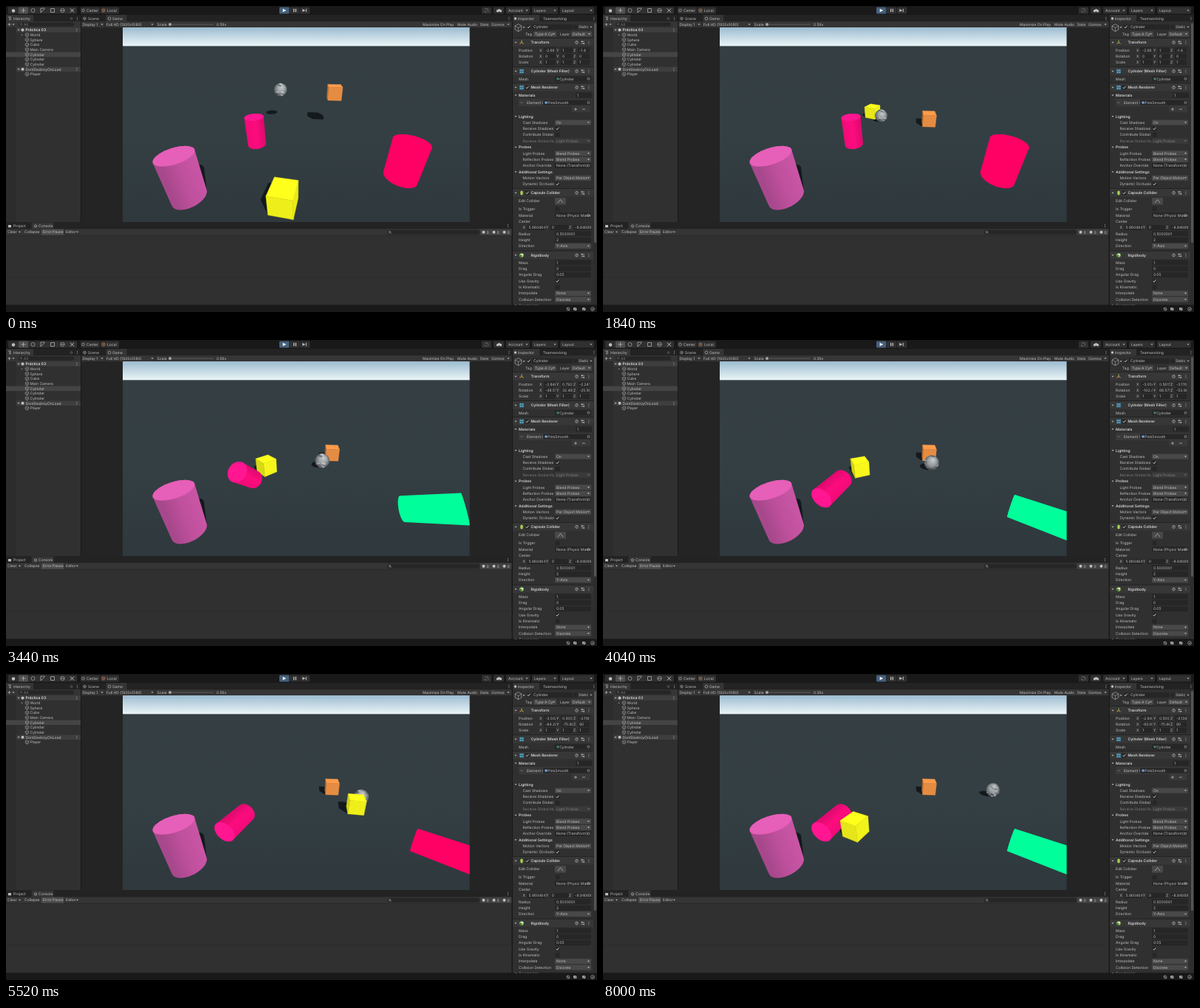
An HTML page with a canvas for the animation above (8040 ms loop, 800 by 415 pixels).

```html
<!DOCTYPE html>
<html lang="en">
<head>
<meta charset="utf-8">
<title>Physics practice</title>
<style>
html, body { margin: 0; width: 100%; height: 100%; overflow: hidden; background: #191919; }
canvas { display: block; }
</style>
</head>
<body>
<canvas id="stage" width="800" height="415"></canvas>
<script>
const ctx = document.getElementById('stage').getContext('2d');
const LOOP = 8040, STEP = 40, TAU = Math.PI * 2;
const INK = '#c0c0c0', DIM = '#7d7d7d', BOLD = '#d6d6d6';
const PANEL = '#303031', BAR = '#353536', STRIP = '#232324', FIELD = '#262627', DROP = '#484849', EDGE = '#191919';

// ---------- drawing helpers ----------
function box(x, y, w, h, c) { ctx.fillStyle = c; ctx.fillRect(x, y, w, h); }
function round(x, y, w, h, c, r = 1) {
  ctx.fillStyle = c; ctx.beginPath(); ctx.roundRect(x, y, w, h, r); ctx.fill();
}
function text(s, x, y, c = INK, bold = false, maxW = 0) {
  ctx.save();
  if (maxW) { ctx.beginPath(); ctx.rect(x - 1, y - 5, maxW + 1, 10); ctx.clip(); }
  ctx.font = (bold ? '600 ' : '') + '5px Inter, "Liberation Sans", sans-serif';
  ctx.textRendering = 'geometricPrecision';
  ctx.fillStyle = c;
  ctx.fillText(s, x, y + 1.8);
  ctx.restore();
}
function trace(pts) { ctx.beginPath(); pts.forEach(p => ctx.lineTo(p[0], p[1])); }
function poly(pts, fill) { trace(pts); ctx.fillStyle = fill; ctx.fill(); }
function line(pts, c = INK, w = .7) { trace(pts); ctx.strokeStyle = c; ctx.lineWidth = w; ctx.stroke(); }
function disc(x, y, r, c = INK) { ctx.beginPath(); ctx.arc(x, y, r, 0, TAU); ctx.fillStyle = c; ctx.fill(); }
function ring(x, y, r, c = INK) {
  ctx.beginPath(); ctx.arc(x, y, r, 0, TAU); ctx.strokeStyle = c; ctx.lineWidth = .6; ctx.stroke();
}
function plus(x, y, r = 2) { line([[x - r, y], [x + r, y]]); line([[x, y - r], [x, y + r]]); }
function arrow(x, y, c = INK) { poly([[x - 1.5, y - .8], [x + 1.5, y - .8], [x, y + 1]], c); }
function play(x, y, r, c) { poly([[x - r, y - r], [x + r, y], [x - r, y + r]], c); }
function dots(x, y) { for (let i = -1; i < 2; i++) box(x, y + i * 1.7 - .4, .8, .8, INK); }
function check(x, y, on = true) {
  round(x - 3, y - 3, 6, 6, FIELD);
  if (on) line([[x - 1.7, y], [x - .5, y + 1.4], [x + 1.9, y - 1.7]], '#d8d8d8', .9);
}
function cubeIcon(x, y, r, c = '#a9a9a9') {
  const p = Array.from({ length: 7 }, (_, i) => [x + r * Math.sin(i * TAU / 6), y - r * Math.cos(i * TAU / 6)]);
  line(p, c, .6);
  for (const i of [1, 3, 5]) line([[x, y], p[i]], c, .5);
}
function hull(pts) {
  pts = pts.slice().sort((a, b) => a[0] - b[0] || a[1] - b[1]);
  const half = list => {
    const h = [];
    for (const p of list) {
      while (h.length > 1) {
        const [a, b] = h.slice(-2);
        if ((b[0] - a[0]) * (p[1] - a[1]) > (b[1] - a[1]) * (p[0] - a[0])) break;
        h.pop();
      }
      h.push(p);
    }
    h.pop();
    return h;
  };
  return half(pts).concat(half(pts.reverse()));
}

// ---------- vectors and easing ----------
const ramp = (t, a, b) => Math.min(1, Math.max(0, (t - a) / (b - a)));
const smooth = k => k * k * (3 - 2 * k);
const lerp = (a, b, k) => a.map((v, i) => v + (b[i] - v) * k);
const dot = (a, b) => a[0] * b[0] + a[1] * b[1] + a[2] * b[2];
const along = (p, d, k) => p.map((v, i) => v + d[i] * k);
const unit = v => v.map(n => n / Math.hypot(...v));
const cross = (a, b) => [a[1] * b[2] - a[2] * b[1], a[2] * b[0] - a[0] * b[2], a[0] * b[1] - a[1] * b[0]];

// ---------- camera ----------
const F = 227.8, CX = 393, CY = 161.5, EYE = 5.87;
const SP = Math.sin(25 * TAU / 360), CP = Math.cos(25 * TAU / 360);
const SUN = [.32, .766, -.557];
const depth = ([, y, z]) => z * CP - (y - EYE) * SP;
const project = p => [CX + F * p[0] / depth(p), CY - F * ((p[1] - EYE) * CP + p[2] * SP) / depth(p)];
const facing = (n, p) => dot(n, along(p, [0, -EYE, 0], 1)) < 0;
function unproject(sx, sy, y) {
  const b = (sy - CY) / F, d = (EYE - y) / (SP + b * CP);
  return [(sx - CX) / F * d, y, d * (CP - b * SP)];
}
function castShadow(pts) {
  poly(hull(pts.map(([x, y, z]) => project([x - .42 * y, 0, z + .727 * y]))), '#13191c');
}
function rim(c, axis, r) {
  const u = unit(cross(axis, [.31, .2, .93])), v = cross(axis, u);
  return Array.from({ length: 40 }, (_, i) =>
    along(along(c, u, r * Math.cos(i * TAU / 40)), v, r * Math.sin(i * TAU / 40)));
}

// ---------- bodies ----------
function cube(sx, sy, yaw, rgb, floor, lift = 0) {
  const mid = along(unproject(sx, sy, .5), [0, 1, 0], lift);
  const c = Math.cos(yaw * TAU / 360), s = Math.sin(yaw * TAU / 360);
  const axes = [[c, 0, -s], [0, 1, 0], [s, 0, c]];
  const faces = [];
  axes.forEach((axis, i) => [-1, 1].forEach(sign => {
    const n = axis.map(v => v * sign), u = axes[(i + 1) % 3], v = axes[(i + 2) % 3];
    const center = along(mid, n, .5);
    const pts = [0, 1, 2, 3].map(q => along(along(center, u, q % 3 ? .5 : -.5), v, q > 1 ? .5 : -.5));
    faces.push({ n, center, pts });
  }));
  return {
    key: sy + 12,
    shadow() { castShadow(faces.flatMap(f => f.pts)); },
    draw() {
      faces.filter(f => facing(f.n, f.center)).forEach(f => {
        const k = Math.min(1, floor + (1 - floor) * Math.max(0, dot(f.n, SUN)) / .77);
        const col = `rgb(${rgb.map(v => Math.round(v * k))})`, pts = f.pts.map(project);
        poly(pts, col);
        line(pts.concat([pts[0]]), col, .4);
      });
    }
  };
}

let seed = 7;
const rnd = () => (seed = seed * 16807 % 2147483647) / 2147483647;
const flecks = Array.from({ length: 34 }, () => ({ h: rnd() * 2 - 1, lon: rnd() * TAU, size: .08 + rnd() * .2, light: rnd() < .5 }));

function ball(sx, sy, lift, spin) {
  const mid = along(unproject(sx, sy, .5), [0, 1, 0], lift);
  const [px, py] = project(mid), r = .54 * F / depth(mid);
  return {
    key: sy + 12,
    shadow() { castShadow(rim(mid, [0, 1, 0], .54)); },
    draw() {
      ctx.save();
      ctx.beginPath(); ctx.arc(px, py, r, 0, TAU); ctx.clip();
      const g = ctx.createRadialGradient(px + r * .2, py - r * .45, 0, px, py, r * 1.1);
      g.addColorStop(0, '#c9ced1'); g.addColorStop(.55, '#979c9f'); g.addColorStop(1, '#45494c');
      box(px - r, py - r, 2 * r, 2 * r, g);
      for (const f of flecks) {
        const w = Math.sqrt(1 - f.h * f.h), a = f.lon + spin;
        if (Math.cos(a) < 0) continue;
        ctx.beginPath();
        ctx.ellipse(px + r * w * Math.sin(a), py + r * f.h, r * f.size * 1.5 * Math.cos(a) + .2, r * f.size * .5, .35, 0, TAU);
        ctx.fillStyle = f.light ? 'rgba(235,240,242,.5)' : 'rgba(50,54,58,.5)';
        ctx.fill();
      }
      ctx.restore();
    }
  };
}

function cylinder({ mid, axis, r, len, key, body, cap, shade }) {
  const ends = [1, -1].map(s => {
    const n = axis.map(v => v * s), c = along(mid, n, len / 2);
    return { n, c, pts: rim(c, n, r) };
  });
  const all = ends.flatMap(e => e.pts);
  return {
    key,
    shadow() { if (shade) castShadow(all); },
    draw() {
      const [a, b] = ends.map(e => project(e.c)), [mx, my] = project(mid);
      const size = r * F / depth(mid), l = Math.hypot(b[0] - a[0], b[1] - a[1]) || 1;
      const nx = (b[1] - a[1]) / l * size, ny = (a[0] - b[0]) / l * size;
      const g = ctx.createLinearGradient(mx - nx, my - ny, mx + nx, my + ny);
      body.forEach((c, i) => g.addColorStop(i / 2, c));
      poly(hull(all.map(project)), g);
      ends.filter(e => facing(e.n, e.c)).forEach(e => poly(e.pts.map(project), cap));
    }
  };
}
// Stands on the ground at a screen point, then tips over onto its side.
function tipping(sx, sy, len, rest, lie, k) {
  return {
    len,
    mid: lerp(along(unproject(sx, sy, 0), [0, 1, 0], len / 2), rest, k),
    axis: unit(lerp([0, 1, 0], lie, k))
  };
}

// ---------- motion ----------
const PUSH = 2900, SETTLE = 4200;
// time, x, y, yaw
const stops = [
  [300, 375.5, 259.5, 11], [1840, 365, 143, 25], [2840, 357, 168, 30], [4040, 348, 172, 65],
  [5520, 473.5, 176.5, 100], [6450, 346, 207, 120], [8000, 341.5, 206.5, 118]
];
function player(t) {
  const i = Math.max(1, stops.findIndex(s => s[0] >= t));
  const [a, b] = [stops[i - 1], stops[i]];
  return lerp(a, b, smooth(ramp(t, a[0], b[0]))).slice(1);
}
function rolling(t) {
  const run = 278 * (1 - Math.exp(-.13 * Math.max(0, t - 1740) / 1000));
  return [373 + run, 147.5 + 20 * Math.sin(Math.PI * run / 184), run / 9];
}
function readout(t) {
  const start = [-2.66, 1, -1.4, 0, 0, 0], tumble = [-3.11, .5, -3.426, -116.8, 78.2, -61.54];
  if (t < PUSH) return start.map(String);
  const s = t / 1000 - 5.52;
  const v = t < SETTLE ? lerp(start, tumble, ramp(t, PUSH, SETTLE))
    : [-3.0021 + .0237 * s, .50001, -3.1182 - .0066 * s, -84.203 - 2.73 * s, -75.961, 90];
  return v.map(n => n % 1 ? n.toFixed(4) : String(n));
}

function scene(t) {
  ctx.save();
  ctx.beginPath(); ctx.rect(158, 29, 469.6, 264); ctx.clip();
  const fade = (y0, y1, ...cols) => {
    const g = ctx.createLinearGradient(0, y0, 0, y1);
    cols.forEach((c, i) => g.addColorStop(i / (cols.length - 1), c));
    box(158, y0, 470, y1 - y0, g);
  };
  fade(29, 54.6, '#9cbbd0', '#c4d9e4', '#ebf5f7');
  fade(54.6, 293, '#343e43', '#343f44', '#2e383d');

  const drop = Math.max(0, 2.2 - 4.9 * (t / 1000) ** 2);
  const [px, py, yaw] = player(t), [bx, by, spin] = rolling(t);
  const green = (t > 2400 && t < 4480) || t > 6200;
  const flat = green ? '#00ff9b' : '#ff0064';
  const midFall = smooth(ramp(t, PUSH, 3950)), sideFall = smooth(ramp(t, PUSH, 3800));
  const items = [
    cube(441, 153, 5, [255, 156, 74], .68, drop),
    cube(px, py, yaw, [255, 255, 28], .82),
    ball(bx, by, drop, spin),
    cylinder({
      ...tipping(340, 187.5, 1.95, [-3.3, .55, 7.72], [-.3, 0, -.955], midFall),
      r: .58, key: 187 + 14 * midFall, body: ['#f00a78', '#fd0c7e', '#dc0a6e'], cap: '#ff1690'
    }),
    cylinder({
      ...tipping(249, 258.5, 2.15, [0, 0, 0], [0, 1, 0], 0),
      r: .66, key: 260, body: ['#a8488c', '#be509c', '#c855a4'], cap: '#e65fb8', shade: true
    }),
    cylinder({
      ...tipping(533, 232, 2.02, [6.36, .6, 5.44], [.78, 0, -.62], sideFall),
      r: .74 - .19 * sideFall, len: 2 + .3 * sideFall, key: 240, body: [flat, flat, flat], cap: flat
    })
  ];
  items.sort((a, b) => a.key - b.key);
  items.forEach(o => o.shadow());
  items.forEach(o => o.draw());
  ctx.restore();
}

// ---------- editor panels ----------
function panel(x, y, w, h, tabX, tabW) {
  box(x, y, w, h, PANEL);
  box(x, y, w, 9, STRIP); box(tabX, y, tabW, 9, BAR);
}
function topBar() {
  round(3, 1.5, 93, 9, PANEL); round(17, 1.5, 13, 9, '#505051');
  disc(10, 6.5, 2.2); plus(23.5, 6, 3); ring(36.5, 6, 2.5);
  line([[47, 9], [47, 3], [53, 3]]); line([[47, 9], [52, 4]]);
  line([[60.5, 3.5], [65.5, 3.5], [65.5, 8.5], [60.5, 8.5], [60.5, 3.5]]);
  ring(76.5, 6, 2.7); line([[74, 6], [79, 6]]);
  line([[87, 8.5], [92, 3.5]], INK, 1); line([[87, 3.5], [92, 8.5]], INK, 1);
  round(101, 1.5, 26, 9, PANEL); ring(104.5, 6, 1.8); text('Center', 109, 6);
  round(128, 1.5, 25, 9, PANEL); cubeIcon(132, 6, 2.3, '#c98a5a'); text('Local', 137, 6);
  [0, 1, 2].forEach(i => round(370 + i * 14, 1.5, 13.3, 9, i ? PANEL : '#46607c'));
  play(377, 6, 2.3, '#fff'); play(403.3, 6, 2, INK); box(405.8, 3.8, 1, 4.4, INK);
  box(389, 3.8, 1.3, 4.4, INK); box(391.7, 3.8, 1.3, 4.4, INK);
  round(644, 1.5, 13, 9, PANEL); line([[648, 4], [652, 4], [653, 8]], DIM); line([[647, 7], [651, 8.5]], DIM);
  round(660, 1.5, 14, 9, PANEL);
  for (let i = -1; i < 2; i++) disc(667.5 + i * 2, 6.8 - (i ? 0 : 1), 1.7);
  [['Account', 677, 32], ['Layers', 712, 35], ['Layout', 750, 46]].forEach(([s, x, w]) => {
    round(x, 1.5, w, 9, PANEL); text(s, x + 3, 6); arrow(x + w - 4, 6);
  });
}

function hierarchy() {
  panel(0, 12, 101, 281, 0, 37);
  for (let i = 0; i < 3; i++) line([[3 + (i > 0), 15 + i * 1.8], [7, 15 + i * 1.8]]);
  text('Hierarchy', 10, 17); ring(88.5, 17, 1.3, DIM); dots(96, 17);
  box(0, 21, 101, 8, BAR); plus(4.5, 25); arrow(10, 25);
  round(17, 22.3, 75, 5.5, FIELD, 2.5); ring(20.5, 24.7, 1.2, DIM); text('All', 24, 25, DIM);
  box(0, 29, 14, 264, '#2c2c2d');
  const rows = ['Práctica 03', 'World', 'Sphere', 'Cube', 'Main Camera', 'Cylinder', 'Cylinder', 'Cylinder', 'DontDestroyOnLoad', 'Player'];
  rows.forEach((s, i) => {
    const y = 32.5 + i * 6.66;
    if (i % 8 === 0) {
      box(14, y - 3.3, 87, 6.6, '#3e3e3f'); arrow(17, y); disc(22.5, y, 2);
      text(s, 26.5, y, i ? INK : '#dedede', !i); dots(95.5, y);
    } else {
      if (i === 5) box(0, y - 3.3, 101, 6.6, '#444445');
      if (i === 1) play(22, y, 1.2, DIM);
      cubeIcon(28.5, y, 2.6); text(s, 32.5, y);
    }
  });
}

function gamePanel() {
  panel(102, 12, 582.5, 281, 135.5, 28);
  box(102, 29, 582.5, 264, '#242424');
  cubeIcon(106.5, 17, 2); text('Scene', 111, 17); ring(140, 17, 1.9); text('Game', 144, 17); dots(680.5, 17);
  box(102, 21, 582.5, 8, BAR);
  text('Display 1', 103.5, 25); arrow(130, 25);
  text('Full HD (1920x1080)', 136, 25); arrow(198, 25);
  for (const x of [133.5, 201.5]) box(x, 21, .6, 8, STRIP);
  text('Scale', 204.5, 25); box(220, 24.6, 61, .9, '#5e5e5e'); disc(222, 25, 2, '#a5a5a5'); text('0.59x', 285, 25);
  text('Maximize On Play', 564, 25); text('Mute Audio', 611, 25); text('Stats', 641.5, 25);
  text('Gizmos', 657, 25); arrow(680, 25);
}

function consolePanel() {
  panel(0, 293.5, 684.5, 112, 34.5, 30);
  round(3, 297, 4, 3.2, INK, .5); text('Project', 10, 298.5);
  cubeIcon(40, 298.5, 2); text('Console', 44, 298.5); dots(679, 298);
  box(0, 302.5, 684.5, 8.5, BAR); box(0, 310.8, 684.5, .6, STRIP);
  text('Clear', 2, 306.5); arrow(18.5, 306.5); text('Collapse', 25, 306.5);
  box(48, 302.7, 30, 8, '#4c4c4d'); text('Error Pause', 50, 306.5); text('Editor', 81, 306.5); arrow(96.5, 306.5);
  round(516, 303.8, 125, 6, FIELD, 3); ring(519.5, 306.5, 1.2); line([[520.4, 307.4], [521.5, 308.5]]);
  box(642, 302.7, 42, 8, '#424243');
  for (let i = 0; i < 3; i++) { disc(646.5 + i * 14, 306.7, 2); text('0', 650.5 + i * 14, 306.7); }
  box(0, 367, 684.5, .6, '#29292a');
}

function header(s, y, icon, toggle) {
  box(686, y - 6, 109, 11, '#373738'); box(686, y - 6.2, 109, .7, '#1c1c1c');
  arrow(690, y); icon(698, y);
  if (toggle) check(705.5, y);
  text(s, 710.5, y, BOLD, true, 62);
  ring(772.5, y, 1.9); text('?', 771.3, y);
  for (const k of [-1.3, 1.3]) { line([[778.5, y + k], [783, y + k]]); disc(781 + k, y + k, .9); }
  dots(788.5, y);
}
function menu(s, y, c = INK, x = 743, w = 49) {
  round(x, y - 3.5, w, 7, c === INK ? DROP : '#3a3a3b'); text(s, x + 2, y, c, false, w - 7); arrow(x + w - 3.5, y, c);
}
function field(s, y, x = 743, w = 49) { round(x, y - 3.5, w, 7, FIELD); text(s, x + 2, y, INK, false, w - 2); }
function pick(s, y, x = 743, tint) {
  field((tint ? '   ' : '') + s, y, x, 792 - x); ring(788.5, y, 1.5);
  if (tint) disc(x + 4, y, 1.8, tint);
}
function vector(vals, x, y, gap) {
  vals.forEach((v, i) => { text('XYZ'[i], x + i * gap, y); field(v, y, x + 6 + i * gap, gap - 7); });
}
// Each row is a label and a function that draws its control.
function rows(list, x, y) {
  list.forEach(([s, control], i) => {
    const ry = y + i * 8.33;
    text(s, x, ry, s.startsWith('Receive G') ? DIM : INK, false, 742 - x);
    control(ry);
  });
}
function section(s, y) { arrow(690, y); text(s, 694, y, BOLD, true); }
const M = (s, c) => y => menu(s, y, c), V = s => y => field(s, y), P = s => y => pick(s, y), C = on => y => check(746.5, y, on);

function inspector(t) {
  panel(686, 12, 114, 393.5, 686, 36);
  disc(689.5, 17, 1.7); text('Inspector', 693, 17); text('Teamworking', 727, 17); dots(795.5, 17);
  cubeIcon(693.5, 29.5, 5, '#c4c4c4'); arrow(701, 29);
  check(707.5, 28.5); field('Cylinder', 28.5, 712, 55); check(771, 28.5, false); text('Static', 775, 28.5, INK, false, 14); arrow(792, 28.5);
  text('Tag', 703, 38); menu('Type A Cyl', 38, INK, 714, 31); text('Layer', 750, 38); menu('Default', 38, INK, 765, 28);

  header('Transform', 49.5, (x, y) => {
    line([[x, y], [x, y - 3]], '#9ac35a', 1);
    for (const k of [-2.6, 2.6]) line([[x, y], [x + k, y + 1.6]], '#d9a13c', 1);
  });
  const v = readout(t), triple = list => y => vector(list, 722, y, 23);
  rows([['Position', triple(v.slice(0, 3))], ['Rotation', triple(v.slice(3))], ['Scale', triple(['1', '1', '1'])]], 694, 59.8);

  const grid = (x, y) => {
    for (const i of [-2.7, .2]) for (const j of [-2.7, .2]) box(x + i, y + j, 2.5, 2.5, '#4d9fc0');
  };
  header('Cylinder (Mesh Filter)', 88.5, grid);
  text('Mesh', 694, 98.7); pick('Cylinder', 98.7, 743, '#3f7f5f');
  header('Mesh Renderer', 110.5, grid, true);
  section('Materials', 121); field('1', 121, 771, 22);
  round(694, 126, 99, 10, '#39393a'); line([[696, 131], [700, 131]], DIM);
  text('Element 0', 705, 131, INK, false, 22); pick('PinkSmooth', 131, 727, '#6ba7dc');
  round(766, 136, 25, 8, '#39393a'); plus(771, 140); line([[780, 140], [784, 140]]);

  section('Lighting', 149.7);
  rows([['Cast Shadows', M('On')], ['Receive Shadows', C(true)], ['Contribute Global Illumination', C(false)],
    ['Receive Global Illumination', M('Light Probes', DIM)]], 699.5, 158);
  section('Probes', 191.5);
  rows([['Light Probes', M('Blend Probes')], ['Reflection Probes', M('Blend Probes')], ['Anchor Override', P('None (Transform)')]], 699.5, 199.8);
  section('Additional Settings', 225);
  rows([['Motion Vectors', M('Per Object Motion')], ['Dynamic Occlusion', C(true)]], 699.5, 233.2);

  header('Capsule Collider', 253.5, (x, y) => round(x - 1.7, y - 3, 3.4, 6, '#a6cf4c', 1.7), true);
  text('Edit Collider', 694, 264);
  round(743, 260, 15, 9.5, DROP); line([[747, 267], [750.5, 262.5], [754, 267]]);
  rows([['Is Trigger', C(false)], ['Material', P('None (Physic Material)')], ['Center', () => {}],
    ['', y => vector(['5.960464e-08', '0', '-8.940697'], 699.5, y, 31.3)],
    ['Radius', V('0.5000001')], ['Height', V('2')], ['Direction', M('Y-Axis')]], 694, 275.5);

  header('Rigidbody', 338, (x, y) => { disc(x, y, 2.8, '#8fc95a'); box(x - .3, y - 2, 2, 2, '#e8efe0'); box(x - 2, y, 1.8, 1.8, '#34502a'); });
  rows([['Mass', V('1')], ['Drag', V('0')], ['Angular Drag', V('0.05')], ['Use Gravity', C(true)], ['Is Kinematic', C(false)],
    ['Interpolate', M('None')], ['Collision Detection', M('Discrete')], ['Constraints', () => {}]], 694, 348);
  arrow(690, 406);
  box(795, 21, 5, 385, '#2d2d2e'); round(796, 23, 3, 298, '#555556', 1.5);
}

function statusBar() {
  box(0, 405.5, 800, 9.5, EDGE);
  ring(761, 411, 2); line([[759, 409], [763, 413]]);
  for (const x of [768, 780]) { round(x, 409, 4.5, 4, '#a8a8a8'); line([[x, 413.5], [x + 5, 408.5]], EDGE); }
  ring(794, 411, 2.4); line([[793, 411], [794, 412], [795.4, 410]]);
}

function frame(now) {
  const t = Math.floor((now % LOOP) / STEP) * STEP;
  box(0, 0, 800, 415, EDGE);
  topBar(); hierarchy(); gamePanel(); consolePanel(); inspector(t); statusBar();
  scene(t);
  requestAnimationFrame(frame);
}
frame(performance.now());
</script>
</body>
</html>
```
